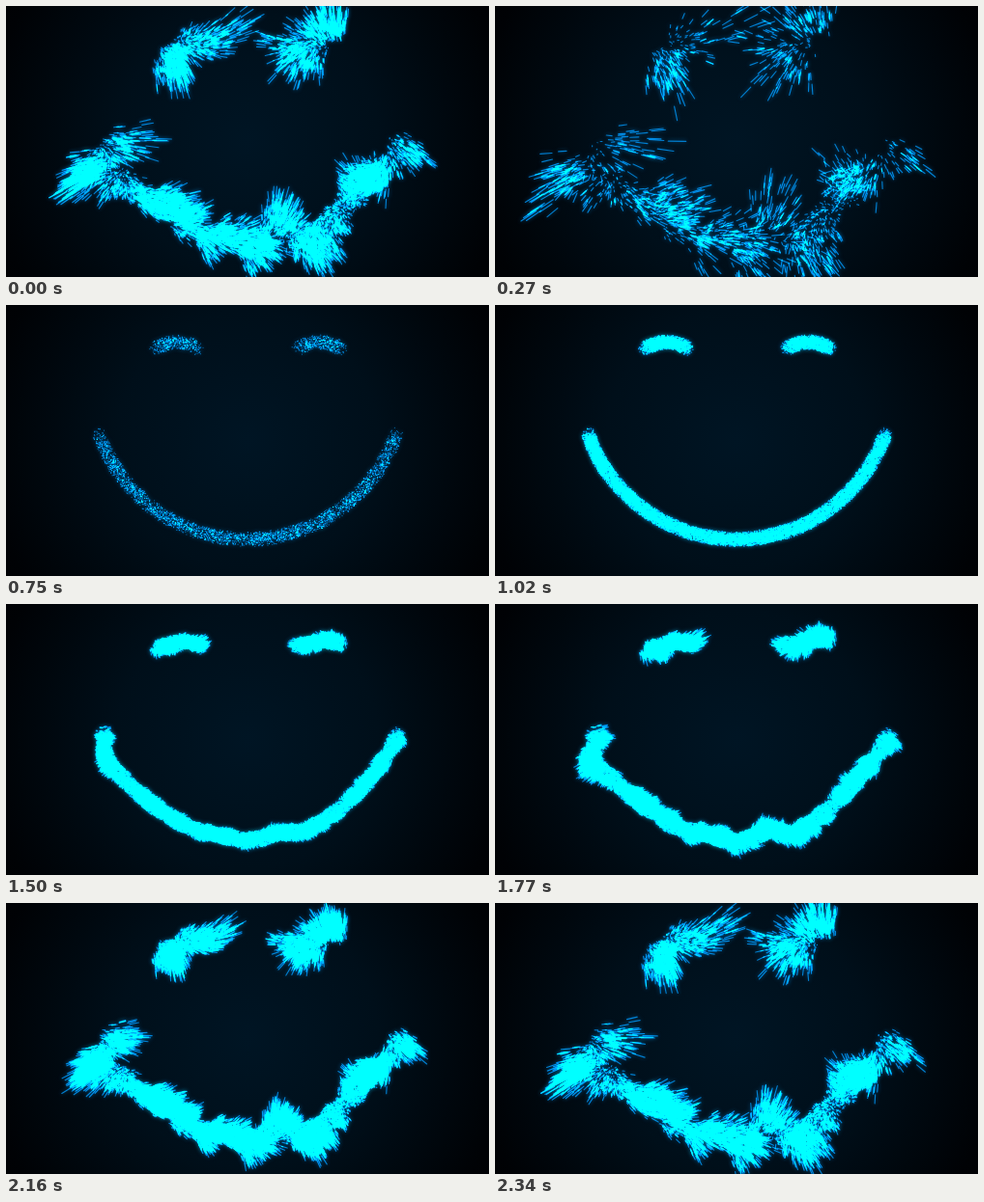
Animation of 500 by 281 pixels, one loop 2370 ms. Source, as an HTML page with a canvas:

```html
<!DOCTYPE html>
<html lang="en">
<head>
<meta charset="utf-8">
<title>Particle smile</title>
<style>
html, body { margin: 0; width: 100%; height: 100%; overflow: hidden; background: #000; }
canvas { display: block; background: radial-gradient(circle 300px at 250px 140px, #001524, #000f1a 45%, #000205 90%, #000103); }
</style>
</head>
<body>
<canvas id="stage" width="500" height="281"></canvas>
<script>
const LOOP = 2370, STEP = 30, START = 750, SPAN = 1590, END = LOOP + 510;
const TRAIL = 160, COUNT = 14000, HALF_WIDTH = 7.6, SPREAD = 1.6;
const canvas = document.getElementById('stage');
const ctx = canvas.getContext('2d');

let seed = 7;
function rand() {
  seed = (seed + 0x6D2B79F5) | 0;
  let n = Math.imul(seed ^ seed >>> 15, 1 | seed);
  n = n + Math.imul(n ^ n >>> 7, 61 | n) ^ n;
  return ((n ^ n >>> 14) >>> 0) / 4294967296;
}

// Each arc runs left to right; wind holds evenly spaced [heading in degrees, reach]
const mouth = {
  x: 250, y: 80, r: 163, from: 2.8, to: 0.34,
  wind: [[5, 46], [155, 50], [45, 12], [0, 28], [-20, 22], [30, 22], [-10, 24], [50, 28],
    [-68, 36], [68, 32], [75, 14], [-90, 8], [-125, 14], [125, 28], [35, 28]]
};
const eye = (x, wind) => ({ x, y: 78.5, r: 40, from: -2.14, to: -1, wind });
const leftEye = eye(177, [[50, 28], [70, 36], [10, 10], [-32, 48]]);
const rightEye = eye(324.5, [[200, 24], [110, 34], [-120, 30], [-100, 34]]);

const polar = ([deg, len]) => [len * Math.cos(deg * Math.PI / 180), len * Math.sin(deg * Math.PI / 180)];

// Blend the two winds nearest to position u (0..1)
function windAt(wind, u) {
  const pos = u * (wind.length - 1), i = Math.min(Math.floor(pos), wind.length - 2);
  const f = pos - i, k = f * f * (3 - 2 * f);
  const [ax, ay] = polar(wind[i]), [bx, by] = polar(wind[i + 1]);
  return [ax + (bx - ax) * k, ay + (by - ay) * k];
}

function makeParticle() {
  const pick = rand();
  const arc = pick < 0.11 ? leftEye : pick < 0.22 ? rightEye : mouth;
  const u = rand(), a = arc.from + (arc.to - arc.from) * u;
  const spin = rand() * 2 * Math.PI, off = HALF_WIDTH * Math.sqrt(rand());
  const ox = off * Math.cos(spin), oy = off * Math.sin(spin);
  const x = arc.x + arc.r * Math.cos(a) + ox;
  const y = arc.y + arc.r * Math.sin(a) + oy;
  const [wx, wy] = windAt(arc.wind, u);
  const speed = 0.4 + 0.75 * rand();
  return {
    x, y,
    dx: speed * (wx + SPREAD * ox + 6 * Math.sin(y * 0.3 + x * 0.1)),
    dy: speed * (wy + SPREAD * oy + 6 * Math.cos(x * 0.28 - y * 0.1)),
    birth: START + Math.max(0, rand() * 300 - 75),
    death: END - 800 * rand() ** 0.62
  };
}
const particles = Array.from({ length: COUNT }, makeParticle);

const travel = t => Math.max(0, (t - START) / SPAN) ** 2.5;

function draw(time) {
  const t = time < START ? time + LOOP : time;
  const head = travel(t), tail = travel(t - TRAIL);
  ctx.clearRect(0, 0, 500, 281);
  ctx.globalCompositeOperation = 'lighter';
  ctx.strokeStyle = 'rgb(0,112,185)';
  ctx.lineWidth = 1.15;
  ctx.lineCap = 'round';
  for (const p of particles) {
    if (t < p.birth || t >= p.death) continue;
    ctx.beginPath();
    ctx.moveTo(p.x + p.dx * tail, p.y + p.dy * tail);
    ctx.lineTo(p.x + p.dx * head + 0.01, p.y + p.dy * head);
    ctx.stroke();
  }
  // Soft bloom
  ctx.filter = 'blur(2px)';
  ctx.globalAlpha = 0.7;
  ctx.drawImage(canvas, 0, 0);
  ctx.filter = 'none';
  ctx.globalAlpha = 1;
}

const began = performance.now();
let shown = -1;
function tick() {
  const time = Math.floor((performance.now() - began) % LOOP / STEP) * STEP;
  if (time !== shown) draw(shown = time);
  requestAnimationFrame(tick);
}
tick();
</script>
</body>
</html>
```
